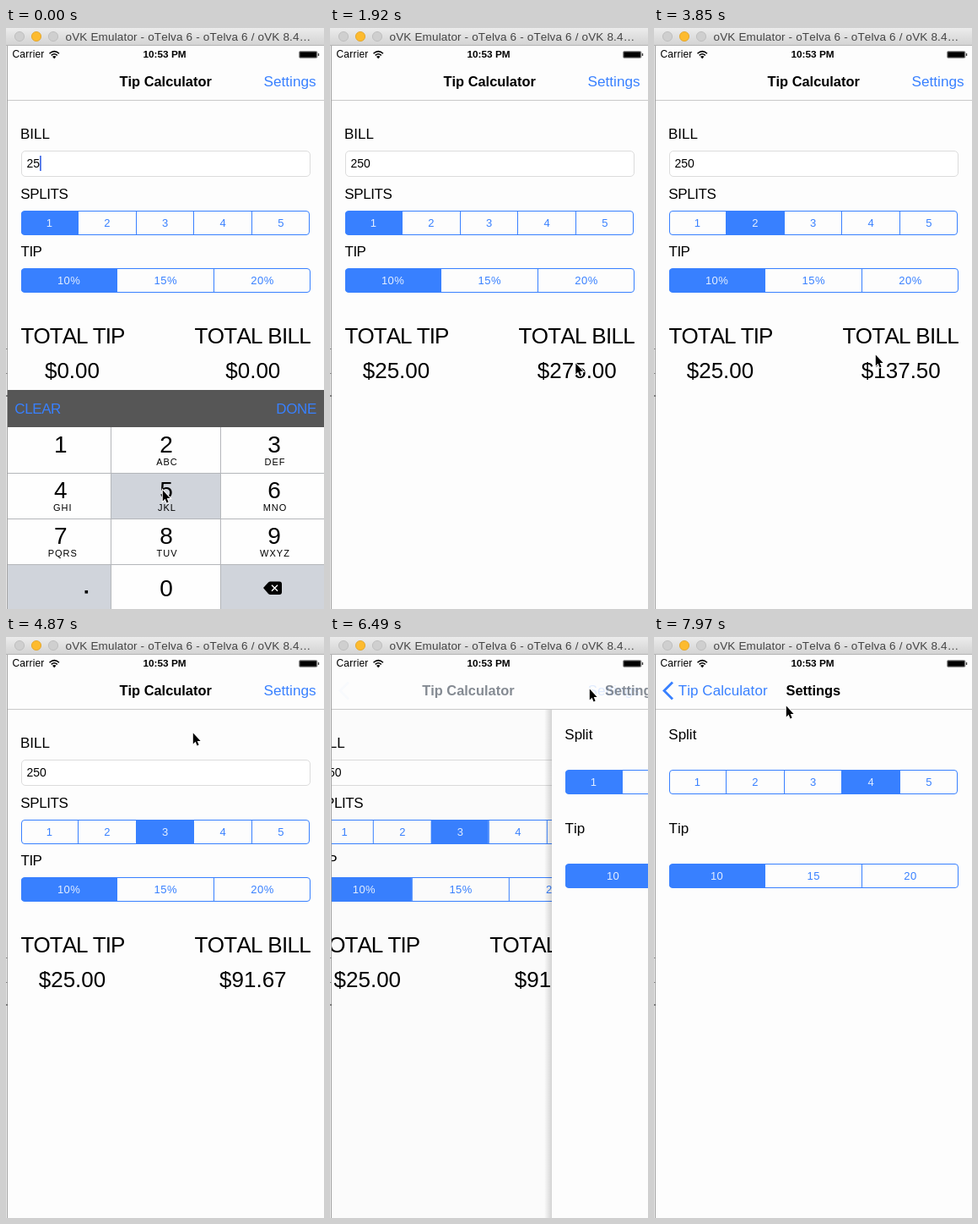
An HTML page that plays this animation: 377x687 px, repeating every 8000 ms.

```html
<!DOCTYPE html>
<html lang="en">
<head>
<meta charset="utf-8">
<title>Tip Calculator</title>
<style>
  html, body { margin: 0; width: 100%; height: 100%; overflow: hidden; background: #fdfdfd; }
  svg { display: block; width: 100%; height: 100%; }
  text { font-family: "Liberation Sans", Arial, sans-serif; font-kerning: none; }
</style>
</head>
<body>
<svg id="stage" viewBox="0 0 377 687">
  <defs>
    <linearGradient id="bar" x2="0" y2="1"><stop stop-color="#ececec"/><stop offset="1" stop-color="#d3d3d3"/></linearGradient>
    <linearGradient id="shade"><stop stop-color="#000" stop-opacity="0"/><stop offset="1" stop-color="#000" stop-opacity=".16"/></linearGradient>
    <clipPath id="app"><path d="M2 21H377V687H2Z"/></clipPath>
  </defs>
  <g id="screen" clip-path="url(#app)"></g>
  <g id="frame"></g>
  <g id="pointer">
    <path d="M.8 1.6V14.4L3.6 11.8 5.6 16.4 7.6 15.6 5.7 11.1H9.6Z" stroke="#fff" stroke-width="2" paint-order="stroke"/>
  </g>
</svg>
<script>
const LOOP = 8000, STEP = 147.6, WIDTH = 375;
const BLUE = '#3880ff', KEY_GREY = '#d0d4db', PAGE = '#fdfdfd';
const $ = id => document.getElementById(id);

// Pointer stops: step, x, y. A stop without a place hides the pointer.
const pointerStops = [
  [0, 185, 545], [1, 186, 549], [4, 190, 655], [6, 190, 655], [7, 205, 640], [8, 265, 550],
  [9, 336, 440], [12, 336, 440], [16, 154, 260], [17, 154, 260], [18, 122, 245], [20, 122, 245],
  [21, 118, 230], [23, 118, 230], [25, 262, 385], [26, 262, 385], [28, 188, 236], [29, 187, 230],
  [30, 174, 480], [31], [33, 221, 112], [34], [37, 330, 2], [40, 307, 60], [46, 307, 60],
  [50, 247, 170], [52, 247, 170], [54, 156, 80], [55, 156, 80]
];
const pushOffset = { 44: 261, 45: 45, 46: 4.5 };

const text = (s, x, y, size, { fill = '#000', anchor = 'start', gap = 0, bold = false, alpha = 1 } = {}) =>
  `<text x="${x}" y="${y}" font-size="${size}" fill="${fill}" text-anchor="${anchor}" letter-spacing="${gap}"
    font-weight="${bold ? 700 : 400}" opacity="${alpha}">${s}</text>`;
const rect = (x, y, w, h, fill, extra = '') =>
  `<rect x="${x}" y="${y}" width="${w}" height="${h}" fill="${fill}" ${extra}/>`;
const line = (d, color, width = 1) => `<path d="${d}" fill="none" stroke="${color}" stroke-width="${width}"/>`;
const shift = (x, y, body) => `<g transform="translate(${x} ${y})">${body}</g>`;

// Cells share a pitch measured from x = 17; the outline starts one pixel later.
function segments(y, labels, selected, width) {
  const pitch = width / labels.length;
  const edge = i => i ? Math.floor(17 + i * pitch) : 18;
  let out = '';
  labels.forEach((label, i) => {
    const x = edge(i), w = edge(i + 1) - x;
    if (i === selected) {
      out += i ? rect(x, y, w, 28, BLUE) : rect(x, y, w, 28, BLUE, 'rx="4"') + rect(x + 5, y, w - 5, 28, BLUE);
    }
    if (i) out += line(`M${x + .5} ${y}v28`, BLUE);
    out += text(label, 17.3 + (i + .5) * pitch, y + 18.7, 13, { fill: i === selected ? '#e4eeff' : BLUE, anchor: 'middle', gap: .45 });
  });
  return out + rect(18.5, y, width - 2, 28, 'none', `rx="3.5" stroke="${BLUE}"`);
}

function calculator(step) {
  const split = step < 22 ? 1 : step < 29 ? 2 : 3;
  const done = step >= 11;
  const money = v => '$' + (done ? v : 0).toFixed(2);
  const middle = { anchor: 'middle' };
  const typed = step < 5 ? '25' : '250';
  const blink = (1 + Math.cos(step * 2 * Math.PI / 7)) / 2;
  return text('BILL', 17, 131, 17) +
    rect(18.5, 145.5, 342, 30, '#fff', 'rx="4.5" stroke="#dcdcdc"') +
    text(typed, 24.5, 165, 14) +
    (done ? '' : rect(typed === '25' ? 40 : 48.5, 151, 1.8, 18, '#4a70e8', `opacity="${blink}"`)) +
    text('SPLITS', 17.3, 201.5, 17, { gap: -.4 }) + segments(216.5, [1, 2, 3, 4, 5], split - 1, 343) +
    text('TIP', 17.6, 270.3, 17, { gap: -.6 }) + segments(284.5, ['10%', '15%', '20%'], 0, 344) +
    text('TOTAL TIP', 17.5, 372.5, 26, { gap: -.95 }) + text('TOTAL BILL', 223.5, 372.5, 26, { gap: -.7 }) +
    text(money(25), 78.5, 414, 26, middle) + text(money(275 / split), 292.8, 414, 26, middle);
}

function settings(step) {
  return text('Split', 17.3, 121, 17) + segments(157.5, [1, 2, 3, 4, 5], step < 52 ? 0 : 3, 343) +
    text('Tip', 17.6, 232, 17) + segments(268.5, [10, 15, 20], 0, 344);
}

function keyboard(step) {
  const letters = ['', 'ABC', 'DEF', 'GHI', 'JKL', 'MNO', 'PQRS', 'TUV', 'WXYZ'];
  const centers = [64.8, 190, 318];
  let out = rect(2, 428, WIDTH, 44, '#565656') +
    text('CLEAR', 10.3, 456, 17, { fill: BLUE, gap: -.4 }) +
    text('DONE', 320.3, 456, 17, { fill: BLUE, gap: -.35, alpha: step === 10 ? .3 : 1 }) +
    rect(2, 472, WIDTH, 215, '#fefefe') +
    rect(2, 635, 122, 52, KEY_GREY) + rect(255, 635, 122, 52, KEY_GREY);
  if (step < 1) out += rect(125, 527, 129, 53, KEY_GREY);
  if (step === 5) out += rect(125, 635, 129, 52, KEY_GREY);
  out += line('M2 526.5H377M2 580.5H377M2 634.5H377M124.5 472V687M254.5 472V687', '#b4b6ba');
  letters.forEach((sub, i) => {
    const x = centers[i % 3], y = 502 + 54 * Math.floor(i / 3);
    out += text(i + 1, x, y, 28, { anchor: 'middle' }) +
      text(sub, x + (i % 3 ? 1 : 2.5), y + 15, 11, { anchor: 'middle', gap: 1 });
  });
  return out + text('0', 190, 671.5, 28, { anchor: 'middle' }) + rect(93.5, 665, 3.6, 3.6, '#000') +
    '<path d="M305 662L311 655.5Q312 654.5 313.5 654.5H324Q327 654.5 327 657.5V667Q327 670 324 670H313.5Q312 670 311 669Z"/>' +
    line('M315 658.7l7 7m0-7l-7 7', '#fff', 1.4);
}

function navigation(step, p) {
  const fade = v => Math.max(0, Math.min(1, v));
  const buttonAlpha = p ? fade(.55 - 1.3 * p) : step === 43 ? .3 : 1;
  const mix = p > 0 && p < 1 ? '#101c2c' : '#000';
  return rect(2, 21, WIDTH, 64.5, PAGE) + line('M2 85.5H377', '#c9c9c9') +
    text('Tip Calculator', 134.5 - 82 * p, 69, 16.4, { bold: true, fill: mix, alpha: fade(1 - 1.6 * p) }) +
    text('Settings', 305.5, 69, 17.2, { fill: BLUE, alpha: buttonAlpha }) +
    text('Settings', 156.5 + 245 * (1 - p), 69, 16.4, { bold: true, fill: mix, alpha: fade(1.6 * p) }) +
    `<g opacity="${p ** 3}">${line('M22 53.5L12 63.5 22 73.5', BLUE, 2.8)}</g>` +
    text('Tip Calculator', 28.7 + 60 * (1 - p), 69, 17, { fill: BLUE, gap: .08, alpha: fade(2 * p - 1) });
}

function statusBar() {
  return text('Carrier', 7.5, 35.3, 12, { gap: .2 }) +
    text('10:53 PM', 162.5, 35.3, 11.8, { bold: true }) +
    line('M51.5 30.2Q57.2 25 63 30.2M53.7 32.4Q57.2 29.2 60.8 32.4', '#000', 1.5) +
    '<path d="M55 33.8Q57.2 32 59.5 33.8L57.2 36.2Z"/>' +
    rect(347.5, 27.5, 21.5, 8, 'none', 'rx="1.5" stroke="#777" stroke-width=".8"') +
    rect(348.2, 28.2, 20.1, 6.6, '#000') + rect(369.8, 30, 1.4, 3, '#444');
}

function screen(step) {
  const off = step < 44 ? WIDTH : pushOffset[step] ?? 0;
  const p = Math.min(1, (WIDTH - off) / 370);
  let out = rect(2, 21, WIDTH, 666, PAGE);
  if (off) out += shift(-.3 * (WIDTH - off), 0, calculator(step));
  if (off < WIDTH) {
    out += rect(2, 86, WIDTH, 601, '#000', `opacity="${.1 * p * p}"`) +
      shift(off, 0, rect(-7, 86, 9, 601, 'url(#shade)') + rect(2, 86, WIDTH, 601, PAGE) + settings(step));
  }
  out += navigation(step, p) + statusBar();
  if (step < 12) out += shift(0, step === 11 ? 120 : 0, keyboard(step));
  return out;
}

function pointerAt(step) {
  const i = pointerStops.findLastIndex(s => s[0] <= step);
  const [from, x, y] = pointerStops[i];
  if (x === undefined) return null;
  const [to, nextX = x, nextY = y] = pointerStops[i + 1] ?? [from + 1];
  const k = (step - from) / (to - from);
  return [x + (nextX - x) * k, y + (nextY - y) * k];
}

$('frame').innerHTML = rect(0, 20, 2, 667, '#eee') + line('M1.5 20V687', '#a2a2a2') +
  line('M0 379.5H2M0 408.5H2', '#888') + line('M0 435H2', '#222') +
  rect(0, 0, 377, 20.5, 'url(#bar)') + line('M0 20.5H377', '#b5b5b5') +
  [[16, '#cfcfcf', '#b9b9b9'], [36, '#fdbb2f', '#dfa023'], [56, '#cfcfcf', '#b9b9b9']].map(([x, fill, edge]) =>
    `<circle cx="${x}" cy="10" r="5.6" fill="${fill}" stroke="${edge}" stroke-width=".8"/>`).join('') +
  text('oVK Emulator - oTelva 6 - oTelva 6 / oVK 8.4…', 70.5, 15, 13.5, { fill: '#444', gap: .16 });

let shown = -1;
function draw(now) {
  const step = Math.floor((now % LOOP + 9) / STEP);
  if (step === shown) return;
  shown = step;
  $('screen').innerHTML = screen(step);
  const at = pointerAt(step);
  $('pointer').setAttribute('visibility', at ? 'visible' : 'hidden');
  if (at) $('pointer').setAttribute('transform', `translate(${at[0]} ${at[1]})`);
}
const start = performance.now();
function tick() {
  draw(performance.now() - start);
  requestAnimationFrame(tick);
}
tick();
</script>
</body>
</html>
```
